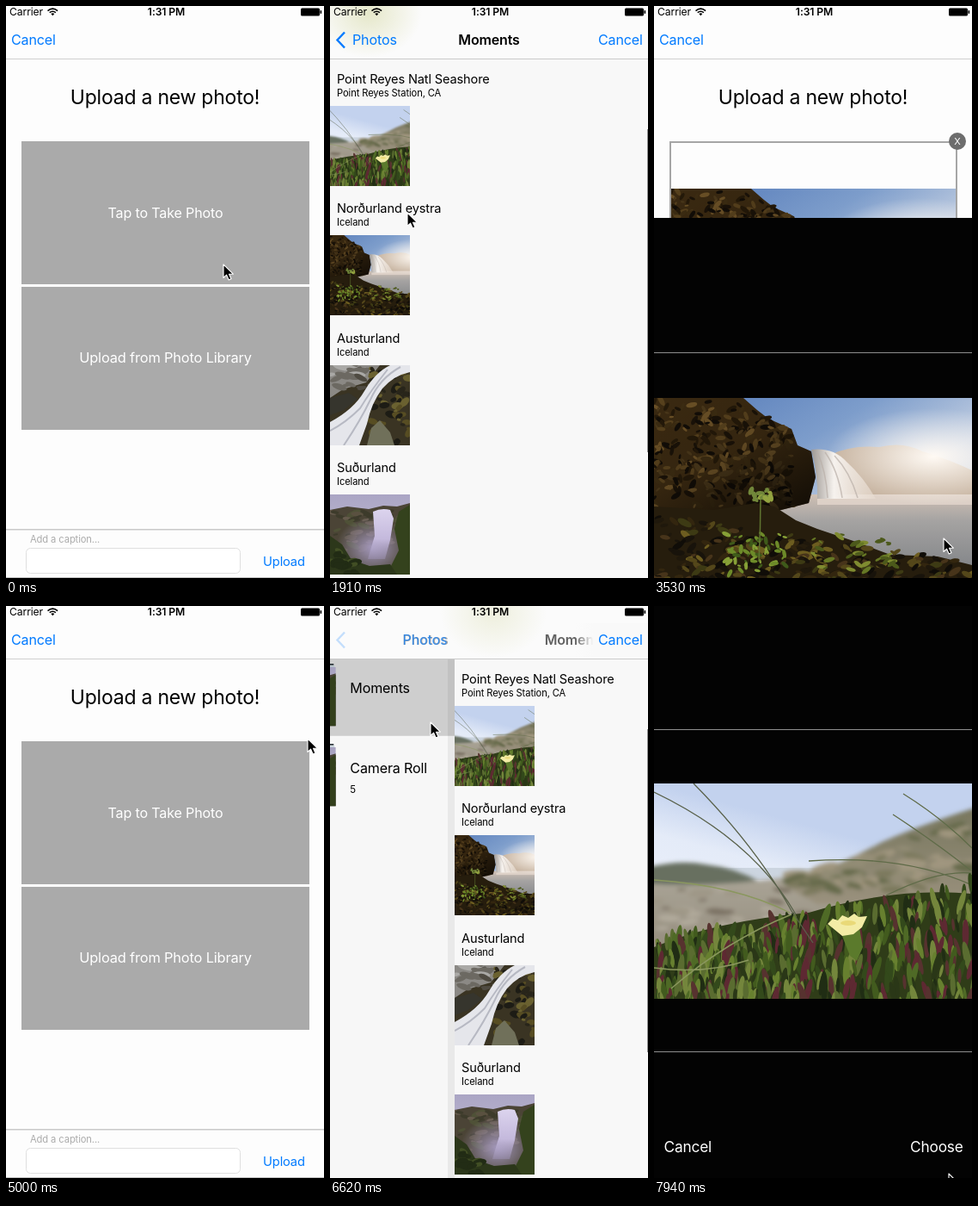
Animation of 370 by 664 pixels, one loop 8000 ms. Source, as an HTML page:

```html
<!DOCTYPE html>
<html lang="en">
<head>
<meta charset="utf-8">
<title>Photo upload</title>
<style>
html, body { margin: 0; width: 100%; height: 100%; overflow: hidden; background: #fdfdfd; }
svg { display: block; width: 100vw; height: 100vh; }
text { font-family: Inter, Roboto, sans-serif; font-size: 16.1px; letter-spacing: -.01em; white-space: pre; }
.blue { fill: #007aff; }
.white { fill: #fff; }
.bold { font-weight: 600; font-size: 16px; }
.mid { text-anchor: middle; }
</style>
</head>
<body>
<svg id="stage" viewBox="0 0 370 664"></svg>
<script>
const W = 370, H = 664, TICK = 147.1, LOOP = 8000;

const rect = (x, y, w, h, fill, more = '') =>
  `<rect x="${x}" y="${y}" width="${w}" height="${h}" fill="${fill}" ${more}/>`;
const path = (d, fill, more = '') => `<path d="${d}" fill="${fill}" ${more}/>`;
const line = (d, stroke, width = 1, more = '') =>
  path(d, 'none', `stroke="${stroke}" stroke-width="${width}" ${more}`);
const text = (x, y, str, cls = '', size = 0) =>
  `<text x="${x}" y="${y}" class="${cls}"${size ? ` style="font-size:${size}px"` : ''}>${str}</text>`;
const group = (id, body) => `<g id="${id}">${body}</g>`;
const soft = body => `<g filter="url(#blur)">${body}</g>`;
const photo = (name, x, y, w, h) =>
  `<use href="#${name}" x="${x}" y="${y}" width="${w}" height="${h}"/>`;
const symbol = (id, w, h, body) =>
  `<symbol id="${id}" viewBox="0 0 ${w} ${h}" preserveAspectRatio="xMidYMid slice">${body}</symbol>`;
const gradient = (id, dir, ...stops) =>
  `<linearGradient id="${id}" x1="0" y1="0" x2="${dir[0]}" y2="${dir[1]}">` +
  stops.map(([at, color, alpha = 1]) =>
    `<stop offset="${at}" stop-color="${color}" stop-opacity="${alpha}"/>`).join('') + '</linearGradient>';
const glow = (id, color, alpha) =>
  `<radialGradient id="${id}"><stop stop-color="${color}" stop-opacity="${alpha}"/>` +
  `<stop offset="1" stop-color="${color}" stop-opacity="0"/></radialGradient>`;

function random(seed) {
  return () => (seed = (seed * 16807) % 2147483647) / 2147483647;
}

// Scattered ellipses; top(x) gives the upper edge of the area.
function scatter(seed, count, [x, w], top, bottom, [rx, ry], tilt, colors) {
  const r = random(seed);
  const spots = Array.from({ length: count }, () => {
    const px = x + r() * w, t = top(px);
    return { px, py: t + r() * (bottom - t), s: .5 + r(), a: (r() - .5) * tilt, c: colors[Math.floor(r() * colors.length)] };
  }).sort((a, b) => a.py - b.py);
  return spots.map(({ px, py, s, a, c }) =>
    `<ellipse rx="${(rx * s).toFixed(1)}" ry="${(ry * s).toFixed(1)}" fill="${c}" ` +
    `transform="translate(${px.toFixed(1)} ${py.toFixed(1)}) rotate(${a.toFixed(0)})"/>`).join('');
}

const defs = '<defs><filter id="blur"><feGaussianBlur stdDeviation="2.5"/></filter>' +
  gradient('skyBlue', [.9, 1], [0, '#5379b8'], [.35, '#7d9dcb'], [.6, '#c3cfe2'], [1, '#ecdccd']) +
  gradient('fall', [1, 0], [0, '#9c9792'], [.35, '#f6f2ee'], [1, '#e9ddd2', .6]) +
  gradient('lake', [0, 1], [0, '#cfc0b4'], [.22, '#a5a3a2'], [.6, '#85878a'], [1, '#6d6f70']) +
  gradient('shade', [.7, 1], [0, '#000', 0], [.5, '#000', .1], [1, '#000', .65]) +
  gradient('skyPale', [-.4, 1], [0, '#c3d2ee'], [.2, '#e4ebf8'], [1, '#f8f9fc']) +
  gradient('sand', [0, 1], [0, '#aaa597'], [1, '#857a6b']) +
  gradient('dune', [0, 1], [0, '#77765e'], [1, '#9a917d']) +
  gradient('dusk', [0, 1], [0, '#aaa5c4'], [1, '#d3cce2']) +
  gradient('veil', [0, 1], [0, '#dcd4ee'], [.6, '#c4b9dc'], [1, '#9d92b4', .5]) +
  gradient('titleFade', [1, 0], [0, '#f9f9f9', 0], [.25, '#f9f9f9'], [1, '#f9f9f9']) +
  glow('sun', '#fffaf4', 1) + glow('mist', '#a99dc4', .95) + glow('tint', '#e3e5c4', .9) +

  symbol('falls', 370, 250,
    rect(0, 0, 370, 250, 'url(#skyBlue)') +
    path('M205 66Q230 54 262 57Q290 50 312 62Q345 72 370 84V128H200Z', '#c4b09c') +
    path('M0 112H370V250H0Z', 'url(#lake)') +
    rect(190, 112, 180, 12, '#e9dcd2', 'opacity=".7"') +
    '<ellipse cx="325" cy="68" rx="125" ry="56" fill="url(#sun)"/>' +
    path('M0 0H104L120 14L133 24L160 36L167 55L183 62L188 92L180 122L140 132L0 150Z', '#3a2911') +
    scatter(7, 330, [0, 162], x => Math.max(3, x * .5 - 42), 126, [5, 2.2], 160,
      ['#57411d', '#241909', '#6a5026', '#1a1208', '#49371a', '#120d07', '#3c2c12']) +
    path('M0 0H104L120 14L133 24L160 36L167 55L183 62L188 92L180 122L140 132L0 150Z', 'url(#shade)') +
    path('M183 60Q208 57 224 74Q244 92 258 117H190Q191 88 183 60Z', 'url(#fall)') +
    line('M190 63Q200 84 202 116M199 63Q214 84 219 116M210 67Q228 86 237 116', '#b9b0a8', 1.6, 'opacity=".7"') +
    path('M0 126L70 130L118 122L140 126L165 142L190 152L232 166L275 182L330 184L370 194V250H0Z', '#261d0d') +
    scatter(21, 420, [0, 370], x => 136 + x * .15, 250, [6, 2.6], 100,
      ['#54471a', '#18130b', '#6d5d20', '#33260f', '#3d3a14', '#100d08', '#47341a', '#1f180c']) +
    scatter(5, 55, [84, 72], () => 158, 204, [4, 1.8], 180, ['#6d8a29', '#87a037', '#3f5a1a']) +
    scatter(12, 34, [185, 95], x => 130 + x * .12, 200, [5, 2], 80, ['#667825', '#7f8b30', '#4c591b']) +
    line('M122 190Q124 150 124 112', '#5f7430', 1.5) +
    scatter(9, 16, [113, 24], () => 105, 120, [4, 2.2], 180, ['#93a340', '#71873a'])) +

  symbol('dunes', 370, 250,
    rect(0, 0, 370, 250, 'url(#skyPale)') +
    rect(0, 98, 200, 14, '#ccd5e0') +
    soft(path('M-10 98Q30 88 60 94Q95 98 125 115L150 125H-10Z', '#687060') +
      path('M-10 116Q80 122 170 106L240 118L380 120V260H-10Z', 'url(#sand)') +
      path('M150 118Q210 98 265 68Q310 48 380 26V140H190Z', 'url(#dune)') +
      scatter(31, 60, [165, 205], x => 165 - x * .35, 125, [13, 4], 50, ['#7b795d', '#928c74', '#666b4b', '#a0967f']) +
      scatter(6, 40, [0, 180], () => 122, 170, [10, 3], 20, ['#9f9787', '#7c7263', '#b1aa9b'])) +
    path('M0 190Q70 160 180 150Q280 120 370 128V250H0Z', '#2f3c18') +
    line('M270 130Q330 100 370 104M278 36Q330 70 370 102M290 12Q335 40 370 75M180 90Q290 82 370 118', '#5f6b48', 1.3) +
    scatter(44, 520, [-4, 378], x => 184 - x * .17, 258, [2.8, 12], 40,
      ['#4f6a26', '#67802f', '#33491b', '#202d14', '#74863c', '#425b1e', '#2a3717', '#5a6c30', '#57322f', '#5e2932']) +
    line('M0 10Q115 65 165 152M46 0Q120 75 160 148L185 185', '#59614a', 1.3) +
    line('M0 112Q95 118 158 150M20 238Q85 182 160 152M0 214Q60 222 110 205', '#8a975e', 1.4) +
    path('M217 172L239 168L243 190L236 206L228 200Z', '#5b7a2c') +
    path('M202 163L208 157L214 159L219 153L226 156L233 151L238 155L248 154L242 167L232 175L219 177Z', '#f3eca6') +
    '<ellipse cx="226" cy="162" rx="9" ry="3" fill="#e9d978"/>') +

  symbol('rapids', 93, 93,
    rect(0, 0, 93, 93, '#3a3423') +
    path('M0 0H58L42 20L15 28L0 38Z', '#8b8985') +
    scatter(3, 22, [0, 50], () => 0, 28, [8, 3], 60, ['#6c6962', '#aaa9a6', '#4f4b42']) +
    scatter(8, 60, [48, 45], () => 4, 90, [5, 3], 120, ['#574d23', '#28251a', '#6a6130', '#1d1c15']) +
    path('M93 0V8Q74 12 61 27Q48 44 43 68L34 93H0V66Q28 51 40 30Q53 8 70 0Z', '#e5e6eb') +
    line('M82 2Q58 15 47 40Q35 65 16 93M67 5Q47 30 35 50Q18 67 0 76', '#b7b9c3', 2) +
    path('M0 38L22 32L32 39L16 52L0 58Z', '#36352d') +
    path('M48 73L58 64L70 78L75 93H43Z', '#70705a')) +

  symbol('gorge', 93, 93,
    rect(0, 0, 93, 93, 'url(#dusk)') +
    path('M0 18L20 14L45 17L62 13L78 14L93 10V93H0Z', '#4b4436') +
    scatter(15, 60, [0, 93], () => 20, 65, [6, 2.2], 50, ['#5a5140', '#3d3b2b', '#4f5137', '#655a4c']) +
    '<ellipse cx="50" cy="62" rx="43" ry="36" fill="url(#mist)"/>' +
    path('M50 20Q60 15 70 18L74 28L70 53L64 75H44L52 48Z', 'url(#veil)') +
    path('M93 12V93H66L80 65L75 40L80 20Z', '#34421d') +
    path('M0 48L14 58L25 76L46 83L70 81L78 93H0Z', '#2c371a') +
    scatter(27, 20, [0, 30], x => 58 + x * .7, 93, [6, 3], 80, ['#414e24', '#222c15'])) + '</defs>';

const chevron = (x, y, color) => line(`M${x} ${y - 6}l6.5 6l-6.5 6`, color, 1.7);

const uploadPage =
  rect(0, 0, W, H, '#fdfdfd') + rect(0, 61, W, 1, '#cfcfcf') +
  text(6, 45, 'Cancel', 'blue') + text(185, 114, 'Upload a new photo!', 'mid', 23) +
  group('choices',
    rect(18, 157, 335, 166, '#aaa') + rect(18, 326, 335, 166, '#aaa') +
    text(185.5, 246, 'Tap to Take Photo', 'mid white') +
    text(185.5, 414, 'Upload from Photo Library', 'mid white', 16.4)) +
  group('chosen',
    rect(19, 158, 333, 333, '#fdfdfd', 'stroke="#a6a6a6" stroke-width="2"') +
    photo('falls', 20, 212, 331, 224) +
    '<circle cx="353" cy="157" r="10" fill="#6d6d6d"/>' + text(353, 161, 'X', 'mid white', 11)) +
  rect(0, 607, W, 1.5, '#c9c9c9') + rect(0, 663, W, 1, '#c4c4c4') +
  `<g opacity=".32">${text(28, 623, 'Add a caption...', '', 11.2)}</g>` +
  rect(23.5, 629.5, 249, 29, '#fff', 'rx="5" stroke="#dfdfdf"') +
  text(299, 650, 'Upload', 'blue', 14.7);

const albumRow = (y, name, count) =>
  rect(11, y + 5, 62, 1.6, '#222c30') + rect(9, y + 7.5, 65, 1, '#a8bfd0') +
  photo('gorge', 7, y + 9, 68.5, 68.5) + text(92, y + 39, name) +
  text(92, y + 62, count, '', 11.5) + chevron(350.5, y + 43.5, '#c4c4c9');

const albumPage =
  rect(0, 0, W, H, '#fdfdfd') +
  `<rect id="highlight" y="62" width="370" height="89" fill="#d3d3d3"/>` +
  rect(0, 150, W, 1, '#dcdcdc') + albumRow(62, 'Moments', '') + albumRow(155, 'Camera Roll', '5');

const moments = [
  ['Point Reyes Natl Seashore', 'Point Reyes Station, CA', 'dunes'],
  ['Norðurland eystra', 'Iceland', 'falls'],
  ['Austurland', 'Iceland', 'rapids'],
  ['Suðurland', 'Iceland', 'gorge']];

const momentPage =
  rect(-8, 62, 8, H, '#000', 'opacity=".06"') + rect(0, 0, W, H, '#f8f8f8') +
  `<g text-anchor="end">${text(122, 49, 'April 12, 2009', '', 14.5)}</g>` +
  moments.map(([title, place, pic], i) => {
    const y = Math.round(i * 150.4);
    return text(8, y + 90, title, '', 14.6) + text(8, y + 105, place, '', 11.2) + photo(pic, 0, y + 116, 93, 93);
  }).join('');

const navBar =
  rect(0, 0, W, 61, '#fbfbfb') + rect(0, 61, W, 1, '#cacaca') +
  '<ellipse id="under" cx="45" cy="8" rx="62" ry="52" fill="url(#tint)"/>' +
  group('oldTitle', text(0, 45, 'Photos', 'bold')) + group('backLabel', text(0, 45, 'Photos', 'blue')) +
  group('backArrow', line('M17 30.5l-8.5 9l8.5 9', '#007aff', 2.4)) +
  group('newTitle', text(185, 45, 'Moments', 'mid bold')) +
  group('fade', rect(285, 20, 85, 40, 'url(#titleFade)')) + text(312, 45, 'Cancel', 'blue');

const cropPage =
  rect(0, 0, W, H, '#030303') +
  group('cropPhoto', photo('falls', 0, 206, 370, 250)) +
  group('cropFrame', rect(-.5, 143.5, W + 1, 374, 'none', 'stroke="#8f8f8f"')) +
  group('cropBar', rect(0, 592, W, 72, '#151513')) +
  text(11.5, 634, 'Cancel', 'white', 17.3) + text(298, 634, 'Choose', 'white', 17.3);

const statusBar =
  text(4, 11, 'Carrier', '', 12.2) + text(186.5, 11, '1:31 PM', 'mid bold', 12.2) +
  line('M48.5 5.6Q54.3 .6 60.1 5.6M50.7 7.7Q54.3 4.7 57.9 7.7', '#000', 1.5) +
  path('M52.3 9L54.3 11.2L56.3 9Q54.3 7.6 52.3 9Z', '#000') +
  rect(343, 2.5, 22, 9, '#000', 'rx="1.5"') + rect(365.5, 5, 1.7, 4, '#000', 'rx="1"');

const arrow = path('M0 0V15.5L3.6 12.2L6.2 18L9 16.8L6.5 11.2H11.3Z', '#000',
  'stroke="#fff" stroke-width="1.1" stroke-linejoin="round"');

document.getElementById('stage').innerHTML = defs + uploadPage +
  group('modal', group('albums', albumPage) + group('list', momentPage) +
    group('nav', navBar) + group('crop', cropPage)) +
  group('status', statusBar) + group('cursor', arrow);

const el = {};
document.querySelectorAll('#stage [id]').forEach(node => el[node.id] = node);
const move = (node, x, y = 0) => node.setAttribute('transform', `translate(${x} ${y})`);
const show = (node, on) => node.setAttribute('opacity', Number(on));

// Slides: first step, then the offset at each following step; the last one stays.
const modalY = [[0, H], [5, 340, 70, 8, 0], [24, 246, 560, 648, H], [40, 330, 66, 7, 0]];
const listX = [[0, W], [10, 250, 40, 4, 0], [28, W], [44, 305, 145, 24, 2, 0]];
const cropX = [[0, W], [16, 290, 87, 12, 1, 0], [28, W], [50, 240, 45, 5, 0]];

// Pointer: step, x, y
const pointer = [
  [0, 253, 300], [1, 262, 332], [2, 279, 392], [3, 287, 424], [5, 287, 424], [6, 250, 330],
  [7, 165, 165], [8, 125, 96], [10, 125, 100], [12, 110, 180], [14, 70, 300], [15, 62, 312],
  [16, 150, 370], [17, 359, 506], [18, 360, 560], [20, 341, 612], [22, 337, 618], [25, 337, 618],
  [28, 345, 350], [31, 352, 160], [32, 351, 154], [34, 351, 154], [36, 310, 300], [38, 215, 410],
  [40, 215, 410], [42, 140, 160], [43, 118, 137], [45, 117, 135], [46, 110, 140], [49, 60, 165],
  [50, 60, 165], [52, 280, 480], [54, 343, 659]];

function slide(track, step) {
  const [start, ...values] = track.filter(row => row[0] <= step).pop();
  return values[Math.min(step - start, values.length - 1)];
}

function pointerAt(step) {
  const i = pointer.findIndex(key => key[0] >= step);
  const b = pointer[i], a = pointer[Math.max(0, i - 1)];
  const f = b[0] === a[0] ? 0 : (step - a[0]) / (b[0] - a[0]);
  return [a[1] + (b[1] - a[1]) * f, a[2] + (b[2] - a[2]) * f];
}

function draw(step) {
  const y = slide(modalY, step), lx = slide(listX, step), cx = slide(cropX, step);
  const p = 1 - lx / W, q = 1 - cx / W;
  const leaving = step >= 24 && step < 28;

  show(el.chosen, step >= 24 && step < 33);
  show(el.choices, step < 24 || step >= 33);
  move(el.modal, 0, y);
  move(el.albums, -113 * p);
  el.albums.style.filter = p ? 'brightness(.975)' : '';
  show(el.highlight, p > 0);
  move(el.list, lx - 114 * q);
  el.list.style.filter = q ? `brightness(${1 - .065 * q})` : '';

  move(el.nav, cx - W, q ? -20 : 0);
  move(el.under, lx);
  show(el.under, p);
  const titleX = 158 - 132 * p ** 1.18;
  move(el.oldTitle, titleX);
  show(el.oldTitle, (1 - p) ** 1.2);
  move(el.backLabel, titleX);
  show(el.backLabel, p ** .7);
  show(el.backArrow, p ** 3);
  move(el.newTitle, 256 * (1 - p));
  show(el.newTitle, p);
  show(el.fade, p > 0 && p < 1);

  move(el.crop, cx);
  el.cropPhoto.firstChild.setAttribute('href', step < 39 ? '#falls' : '#dunes');
  move(el.cropPhoto, 0, leaving ? 3 : 0);
  move(el.cropFrame, 0, leaving ? 13 : 0);
  show(el.cropBar, cx > 0);
  show(el.status, !q || y > 0);
  move(el.cursor, ...pointerAt(step));
}

let last = -1;
function tick(now) {
  const step = Math.min(54, Math.floor((now % LOOP + 6) / TICK));
  if (step !== last) draw(last = step);
  requestAnimationFrame(tick);
}
draw(0);
requestAnimationFrame(tick);
</script>
</body>
</html>
```
